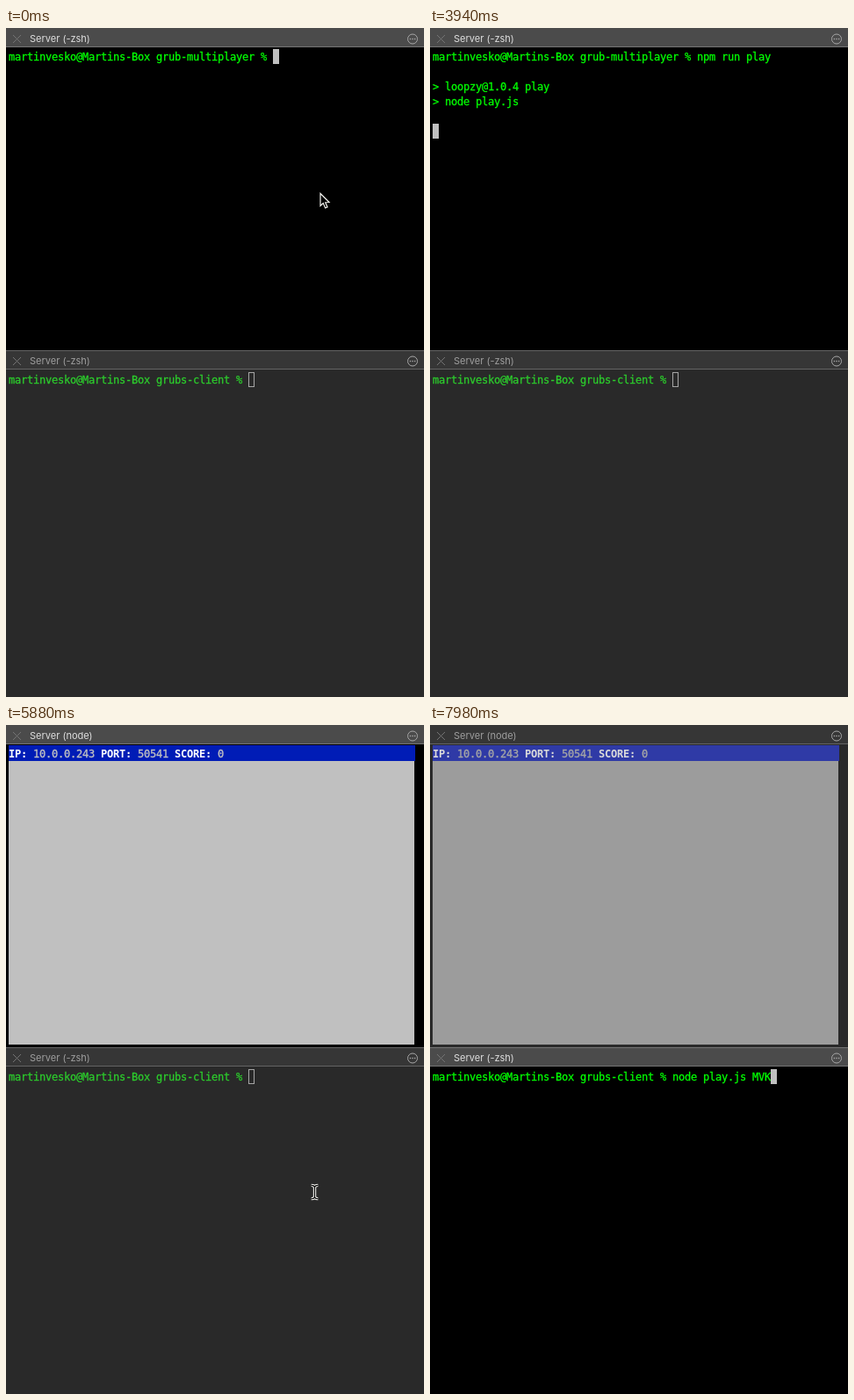
These frames come from a looping animation (476 px wide and 762 px high, 8 s). An HTML page with a canvas:

```html
<!DOCTYPE html>
<html lang="en">
<head>
<meta charset="utf-8">
<title>Two terminals</title>
<style>
html, body { margin: 0; width: 100%; height: 100%; overflow: hidden; background: #000; }
canvas { display: block; }
</style>
</head>
<body>
<canvas id="stage" width="476" height="762"></canvas>
<script>
const ctx = document.getElementById('stage').getContext('2d');
const W = 476, H = 762, LOOP = 8000;
const COL = 7, ROW = 17, LEFT = 3;
const MONO = '12px "DejaVu Sans Mono", monospace';
const TITLE = '11px Inter, "Open Sans", sans-serif';

const USER = 'martinvesko@Martins-Box';
const PANES = [
  { top: 0, height: 367, prompt: USER + ' grub-multiplayer % ' },
  { top: 367, height: 395, prompt: USER + ' grubs-client % ' }
];
const RUN = 'npm run play';
const JOIN = 'node play.js MVK';

// Moments in ms
const T = { run: 1280, runEnd: 1560, enter: 3080, output: 3580, game: 4040,
            retitle: 4400, move: 4480, moveEnd: 5040, focus: 5900, join: 6880, joinEnd: 7540 };

const LIVE = { bg: '#000', bar: '#4b4b4b', line: '#757575', title: '#dedede', icon: '#747474',
               text: '#00ff00', label: '#fff', value: '#c2c2c2', blue: '#001cb6', field: '#c0c0c0' };
const DIM = { bg: '#292929', bar: '#363636', line: '#646464', title: '#9e9e9e', icon: '#747474',
              text: '#2ccb2c', label: '#dadada', value: '#a6a6a6', blue: '#2f3aa6', field: '#9c9c9c' };

function box(x, y, w, h, color) {
  ctx.fillStyle = color;
  ctx.fillRect(x, y, w, h);
}

function path(points, closed) {
  ctx.beginPath();
  points.forEach(([x, y]) => ctx.lineTo(x, y));
  if (closed) ctx.closePath();
}

// Monospaced text on the terminal grid
function write(text, col, y, color, bold) {
  ctx.font = (bold ? 'bold ' : '') + MONO;
  ctx.fillStyle = ctx.strokeStyle = color;
  ctx.lineWidth = 0.3;
  [...text].forEach((ch, i) => {
    const x = LEFT + (col + i) * COL;
    ctx.fillText(ch, x, y + 13);
    if (!bold) ctx.strokeText(ch, x, y + 13);
  });
}

function caret(col, y, active) {
  const x = LEFT + col * COL;
  if (active) return box(x, y, COL, ROW, '#c0c0c0');
  ctx.strokeStyle = '#a6a6a6';
  ctx.lineWidth = 1;
  ctx.strokeRect(x + 0.5, y + 0.5, COL - 1, ROW - 1);
}

function frame(pane, title, skin) {
  const y = pane.top;
  box(0, y, W, pane.height, skin.bg);
  box(0, y, W, 22, skin.bar);
  box(0, y + 21, W, 1, skin.line);
  if (y) box(0, y, W, 1, skin.line);

  ctx.strokeStyle = skin.icon;
  ctx.lineWidth = 1;
  path([[8, y + 8], [17, y + 17]]);
  ctx.stroke();
  path([[17, y + 8], [8, y + 17]]);
  ctx.stroke();

  ctx.font = TITLE;
  ctx.fillStyle = skin.title;
  ctx.fillText(title, 27, y + 15.5);

  ctx.strokeStyle = '#a6a6a6';
  ctx.beginPath();
  ctx.arc(463, y + 12.5, 5.5, 0, Math.PI * 2);
  ctx.stroke();
  for (let i = -1; i < 2; i++) box(462.3 + i * 2.6, y + 11.8, 1.4, 1.4, '#a6a6a6');
}

function game(skin) {
  box(LEFT, 23, 463, 18, skin.blue);
  box(LEFT, 41, 462, 323, skin.field);
  let col = 0;
  ['IP:', '10.0.0.243', 'PORT:', '50541', 'SCORE:', '0'].forEach((word, i) => {
    write(word, col, 24, i % 2 ? skin.value : skin.label, i % 2 === 0);
    col += word.length + 1;
  });
}

function typed(text, t, start, end, steps) {
  if (t < start) return '';
  const n = Math.floor((t - start) / (end - start) * (steps - 1) + 1.001);
  return text.slice(0, Math.min(text.length, n * text.length / steps));
}

function server(t, skin) {
  frame(PANES[0], t < T.retitle ? 'Server (-zsh)' : 'Server (node)', skin);
  if (t >= T.game) return game(skin);
  const line = PANES[0].prompt + typed(RUN, t, T.run, T.runEnd, 6);
  write(line, 0, 24, skin.text);
  if (t < T.enter) return caret(line.length, 24, true);
  if (t < T.output) return caret(0, 24 + ROW, true);
  write('> loopzy@1.0.4 play', 0, 24 + ROW * 2, skin.text);
  write('> node play.js', 0, 24 + ROW * 3, skin.text);
  caret(0, 24 + ROW * 5, true);
}

function client(t, skin) {
  frame(PANES[1], 'Server (-zsh)', skin);
  const line = PANES[1].prompt + typed(JOIN, t, T.join, T.joinEnd, JOIN.length);
  write(line, 0, 392, skin.text);
  caret(line.length, 392, t >= T.focus);
}

function arrow(x, y) {
  path([[0, 0], [0, 14], [3.2, 11], [5.6, 16.4], [8, 15.4], [5.7, 10.2], [10, 10]]
    .map(([dx, dy]) => [x + dx, y + dy]), true);
  ctx.fillStyle = '#000';
  ctx.fill();
  ctx.strokeStyle = '#f4f4f0';
  ctx.lineWidth = 1.2;
  ctx.stroke();
}

function beam(x, y) {
  for (const [width, color] of [[3.4, '#f4f4f0'], [1.2, '#000']]) {
    ctx.strokeStyle = color;
    ctx.lineWidth = width;
    ctx.beginPath();
    for (const s of [-1, 1]) {
      ctx.moveTo(x - 3.8, y + s * 7.6);
      ctx.quadraticCurveTo(x, y + s * 7.6, x, y + s * 5);
      ctx.quadraticCurveTo(x, y + s * 7.6, x + 3.8, y + s * 7.6);
    }
    ctx.moveTo(x, y - 5);
    ctx.lineTo(x, y + 5);
    ctx.stroke();
  }
}

function pointer(t) {
  if (t < T.run) return arrow(358, 188.5);
  if (t < T.move || t >= T.join) return;
  const p = Math.min(1, (t - T.move) / (T.moveEnd - T.move));
  const e = p * p * (3 - 2 * p);
  const x = 358 - 6.5 * e, y = 188.5 + 343.5 * e;
  if (y < 390) arrow(x, y);
  else beam(x, y);
}

function draw(t) {
  const top = t < T.focus;
  ctx.clearRect(0, 0, W, H);
  server(t, top ? LIVE : DIM);
  client(t, top ? DIM : LIVE);
  pointer(t);
}

let start = null;
function tick(now) {
  if (start === null) start = now;
  draw((now - start) % LOOP);
  requestAnimationFrame(tick);
}
draw(0);
requestAnimationFrame(tick);
</script>
</body>
</html>
```
